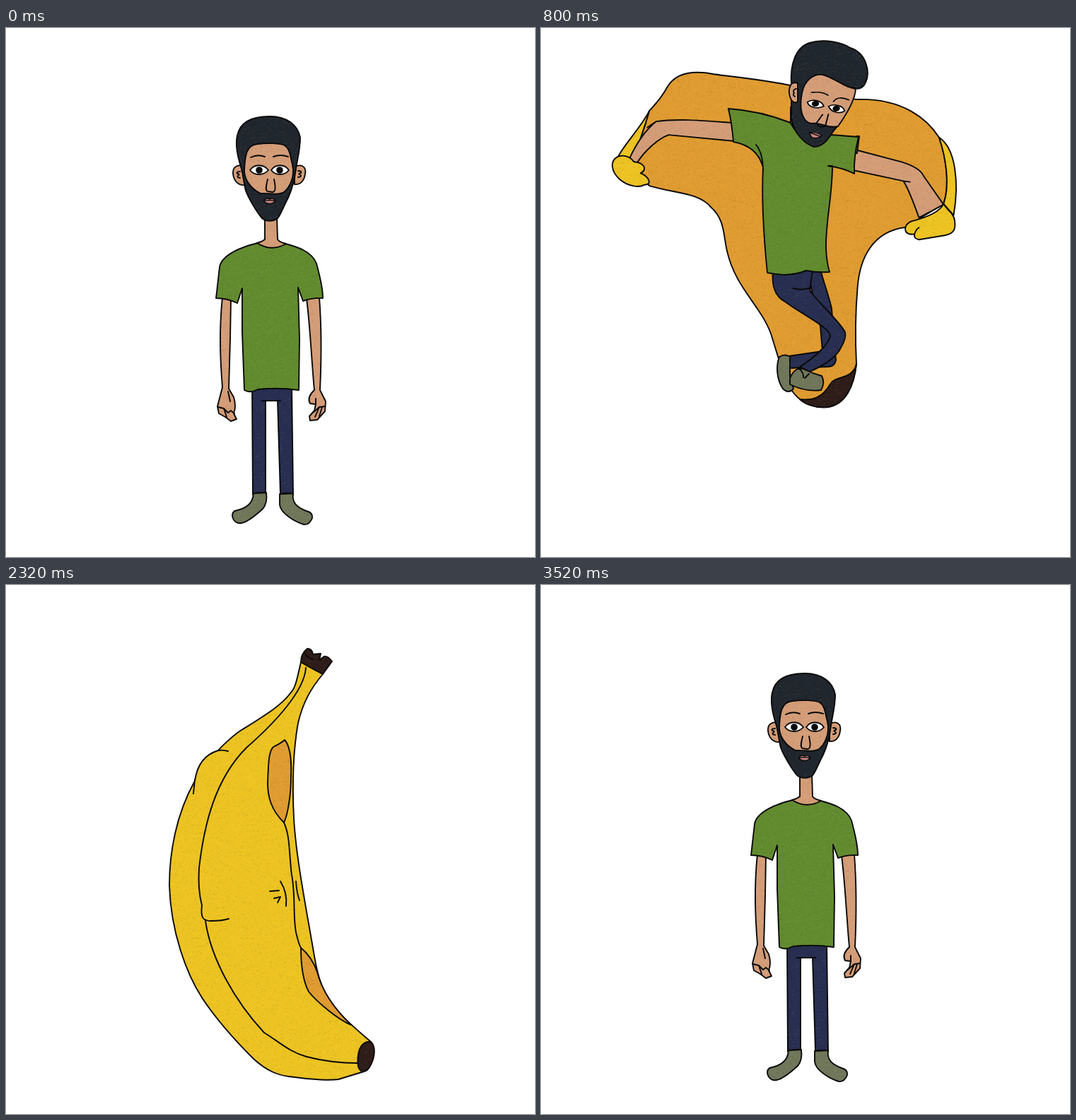
An HTML page with a canvas for the animation above (3680 ms loop, 748x748 px).

```html
<!DOCTYPE html>
<html lang="en">
<head>
<meta charset="utf-8">
<title>Banana man</title>
<style>
html, body { margin: 0; width: 100%; height: 100%; overflow: hidden; background: #fff; }
canvas { display: block; }
</style>
</head>
<body>
<canvas id="stage" width="748" height="748"></canvas>
<script>
const ctx = document.getElementById('stage').getContext('2d');
const HAIR = '#20262d', SKIN = '#d49d78', SHIRT = '#628b2f', JEANS = '#272e51', SHOE = '#70775a';
const PEEL = '#edc422', FLESH = '#e09c31', TIP = '#2e1c19', LIP = '#c98580', INK = '#080808';

const lerp = (a, b, e) => a + (b - a) * e;

// Fills the first closed outline only, then inks every line
function shape(d, fill, width = 1.9) {
  if (fill) {
    ctx.fillStyle = fill;
    ctx.fill(new Path2D(d.split('Z')[0]));
  }
  ctx.lineWidth = width;
  ctx.strokeStyle = INK;
  ctx.stroke(new Path2D(d));
}
function dot(x, y, r) {
  ctx.beginPath();
  ctx.arc(x, y, r, 0, 7);
  ctx.fillStyle = INK;
  ctx.fill();
}
function limbs(list, width, color) {
  for (const [w, c] of [[width + 3.8, INK], [width, color]]) {
    ctx.lineWidth = w;
    ctx.strokeStyle = c;
    for (const pts of list) {
      ctx.beginPath();
      pts.forEach(p => ctx.lineTo(...p));
      ctx.stroke();
    }
  }
}
function at(x, y, draw) {
  ctx.save();
  ctx.translate(x, y);
  draw();
  ctx.restore();
}
// Blends two paths that share the same commands
function mix(a, b, e) {
  const n = b.match(/[\d.]+/g);
  let i = 0;
  return a.replace(/[\d.]+/g, v => lerp(+v, +n[i++], e));
}
const warp = (d, map) => d.replace(/(-?[\d.]+) (-?[\d.]+)/g, (_, x, y) => map(+x, +y).join(' '));

function eye(d, x, y) {
  shape(d, '#fff', 1.8);
  dot(x, y, 4.8);
}

function frontHead() {
  shape('M366 266 L366 299 Q361 303 355 304 Q375 317 396 305 Q387 303 384 299 L383 266Z', SKIN);
  shape('M338 196 C328 192 320 196 321 206 C322 216 328 223 338 222Z', SKIN);
  shape('M408 196 C418 192 425 196 423 206 C422 216 416 222 408 221Z', SKIN);
  shape('M331 203 Q325 203 327 206 Q331 207 329 208 Q325 211 331 212');
  shape('M413 202 Q419 202 417 205 Q413 206 415 207 Q420 210 413 211');
  shape('M332 196 C327 180 324 165 327 152 C331 133 348 125 373 125 C398 125 413 138 416 155 C416 172 412 185 410 199 C408 215 405 227 399 240 C392 253 388 265 384 269 C378 274 368 274 362 269 C355 261 343 241 339 230 C336 218 335 205 332 196Z', HAIR);
  shape('M337 200 C338 185 338 165 356 164 C370 162 388 163 394 166 C402 171 402 183 405 193 L406 200 C407 215 398 232 388 234 C380 236 366 233 360 234 C345 227 336 212 337 200Z', SKIN);
  eye('M345 201 C351 192 364 192 371 201 C364 209 351 209 345 201Z', 358, 201);
  eye('M375 201 C381 192 394 192 400 201 C394 209 381 209 375 201Z', 387, 201);
  shape('M346 183 Q356 178 366 182 M378 182 Q388 178 399 182');
  shape('M370 214 C368 222 366 230 370 231 L377 232 C383 231 380 220 379 214');
  shape('M364 245 Q368 239 373 242 Q378 239 381 245 Q373 252 364 245Z M364 245 Q373 242 381 245', LIP, 1.4);
}

const standShirt = 'M356 304 C335 309 305 320 302 338 L297 382 Q313 382 327 389 L334 368 L334 430 L337 512 Q345 517 356 511 Q385 508 414 512 L415 440 L413 367 L420 386 Q434 381 448 382 C448 365 442 345 439 333 C432 315 410 309 395 305 Q375 316 356 304Z';
const crouchShirt = 'M348 447 C330 450 309 464 306 486 L302 523 Q318 521 333 525 L335 490 L335 530 L339 580 Q352 577 362 580 Q388 590 411 579 L406 540 L405 487 L409 526 Q425 524 439 526 C438 510 438 490 432 476 C424 460 400 450 388 447 Q368 460 348 447Z';

function standShoes() {
  shape('M350 658 L368 657 Q370 672 363 680 C352 690 340 699 333 700 C322 702 316 688 323 683 C336 680 349 675 350 658Z', SHOE);
  shape('M387 659 L406 658 C404 672 412 678 425 683 Q434 685 433 693 Q429 703 421 702 C408 698 388 686 387 674Z', SHOE);
}
function crouchShoes() {
  shape('M352 652 L369 651 Q367 670 373 680 Q377 695 366 696 L350 697 Q342 692 347 680 Q351 665 352 652Z M349 679 Q358 674 368 676', SHOE);
  shape('M390 653 L406 654 Q407 672 418 676 Q421 690 418 697 L398 697 Q390 690 393 680 Q385 668 387 660Z M397 663 L408 664 M398 676 Q408 672 412 674', SHOE);
}

function stand() {
  shape('M348 505 L349 660 Q358 656 367 657 L367 527 L384 527 L388 659 Q398 656 406 660 L404 505Z M362 527 L388 527', JEANS);
  standShoes();
  shape('M306 380 L318 383 L317 440 L315 510 L322 522 Q326 535 322 545 L326 553 L318 556 L310 550 L301 545 L299 535 L306 508 C303 470 301 430 306 380Z', SKIN);
  shape('M314 514 L317 528 M300 536 L308 538 L312 550 M308 538 L314 544 L318 541 L323 545');
  shape('M425 383 L443 381 C446 420 446 470 444 512 L452 528 L451 542 L440 554 L430 555 L429 549 L436 541 L438 532 L430 531 Q425 522 436 512 C432 470 430 420 425 383Z', SKIN);
  shape('M438 532 L438 524 M451 535 L443 536 L437 550 M443 536 L435 543 M447 536 L443 549');
  shape(standShirt, SHIRT);
  frontHead();
}

function crouch() {
  shape('M305 521 L301 558 Q301 564 310 567 L338 578 L336 571 L323 562 Q320 545 326 521Z', SKIN);
  shape('M437 524 L442 557 Q440 566 430 570 L410 577 L411 567 Q426 560 421 556 L415 522Z', SKIN);
  shape(crouchShirt, SHIRT);
  crouchShoes();
  shape('M320 572 C308 572 297 585 301 600 C305 612 340 640 353 655 L368 652 C360 635 350 622 347 614 C365 620 395 620 412 614 C405 630 395 645 393 653 L406 654 C420 635 448 612 449 592 C450 578 436 568 420 571 C400 588 380 586 365 582 C345 583 335 573 320 572Z', JEANS);
  shape('M340 597 Q341 607 335 612 M340 603 L347 614 M414 596 Q413 607 418 601 M414 602 L410 615 M350 576 L372 577 M354 573 Q378 569 384 577');
  at(-7, 150, frontHead);
}

// Sinking from standing to crouching while the arms swing out
function sink(k) {
  const e = [0, .08, .25, .5, .75, .92][k], out = [0, .7, 1, .8, .5, .2][k];
  const arm = (cuff, side) => {
    const y = lerp(380, 520, e);
    return [[cuff, y], [cuff + side * 55 * out, y + lerp(60, 40, e)],
      [cuff + side * 106 * out, lerp(530, 572, e) - 85 * out]];
  };
  const leg = (hip, knee, foot) =>
    [[hip, lerp(515, 598, e)], [lerp(hip, knee, e), lerp(588, 592, e)], [foot, 650]];
  const legs = () => {
    limbs([leg(358, 314, 360), leg(394, 436, 397), [[358, lerp(515, 598, e)], [394, lerp(515, 598, e)]]], 18, JEANS);
    (e < .5 ? standShoes : crouchShoes)();
  };
  if (e < .7) legs();
  limbs([arm(313, -1), arm(432, 1)], 13, SKIN);
  shape(mix(standShirt, crouchShirt, e), SHIRT);
  if (e >= .7) legs();
  at(-7 * e, 150 * e, frontHead);
}

function sideFeatures() {
  eye('M329 253 C334 245 346 245 352 252 C346 260 334 260 329 253Z', 340, 252);
  eye('M358 250 C364 243 376 243 381 250 C376 258 364 257 358 250Z', 369, 250);
  shape('M328 237 Q340 231 350 234 M361 241 Q362 230 379 232');
  shape('M356 265 L354 280 Q360 287 367 281 L363 262');
  shape('M351 297 Q360 293 369 296 Q366 304 357 303Z M351 297 L368 298', LIP, 1.4);
}

// Arms spread wide; the peel hangs between the fists
function open({ dy = 0, left = 1, right = 1, lift = 0, peel = true }) {
  const spread = d => warp(d, (x, y) => {
    const far = x < 266 ? 266 - x : Math.max(0, x - 446);
    return [x < 266 ? 266 - far * left : x > 446 ? 446 + far * right : x, y - lift * far / 100];
  });
  const wide = (d, fill) => shape(spread(d), fill);
  at(0, dy, () => {
    if (peel) {
      wide('M357 155 C320 147 280 143 250 143 C225 144 210 155 202 175 C195 195 188 206 183 215 C180 230 175 255 165 292 L183 321 C210 324 235 315 247 332 C262 345 260 370 264 390 C275 440 310 465 325 505 C336 540 345 575 358 590 C370 605 390 611 405 609 C430 606 443 575 446 548 C444 510 445 470 447 440 C449 400 460 365 490 368 L524 345 C530 320 526 280 520 250 C510 222 488 184 445 174Z', FLESH);
      shape('M446 548 C443 580 430 606 405 609 C388 611 372 604 366 598 C385 600 398 595 408 578 C415 563 440 572 446 548Z', TIP);
      wide('M183 215 C175 240 152 280 150 292 L165 292 C175 255 180 230 183 215Z', PEEL);
      wide('M520 250 C535 270 538 320 533 364 L524 345 C530 320 526 280 520 250Z', PEEL);
    }
    shape('M376 415 L396 418 C402 440 408 455 411 470 L417 543 Q415 552 405 552 L350 554 L350 537 L398 530 L395 495Z', JEANS);
    shape('M328 416 C326 435 330 452 345 460 C370 478 390 487 404 500 Q411 506 408 512 C400 528 385 540 366 552 L380 559 C400 550 418 538 424 525 Q432 512 430 503 C420 485 395 465 380 444 L384 416Z M356 441 Q370 445 382 440', JEANS);
    shape('M337 538 C332 550 333 570 342 583 Q350 591 357 583 L352 565 L352 538 Q345 533 337 538Z', SHOE);
    shape('M352 568 Q360 550 373 556 Q385 562 397 565 Q402 575 396 585 Q375 588 352 577Z M362 553 Q372 559 371 567 M373 568 L379 562', SHOE);
    wide('M270 207 C240 212 215 216 190 228 C178 245 168 270 162 290 L170 293 C178 273 192 252 203 243 L274 233Z M190 228 L181 239', SKIN);
    wide('M444 245 L487 275 Q503 288 506 300 L524 346 L502 358 C498 340 493 315 488 302 L441 274Z M488 302 L494 305', SKIN);
    const fist = peel ? PEEL : SKIN;
    wide('M150 290 C142 298 143 312 152 321 C160 328 172 328 178 321 C187 318 182 308 174 306 C183 296 175 290 167 292 C163 285 155 285 150 290Z', fist);
    wide('M524 345 C527 355 533 360 534 372 C535 385 533 390 525 390 L502 389 Q497 386 498 380 C488 380 487 364 495 361 C507 360 520 357 524 345Z M498 380 Q499 374 502 372', fist);
    shape('M446 226 L450 226 L447 250 L440 250Z', SHIRT);
    shape('M265 187 Q310 190 353 207 Q372 245 410 224 L449 227 Q442 255 443 279 Q425 270 406 268 L412 268 C412 310 402 350 403 385 Q404 405 408 418 Q390 419 375 416 Q350 426 320 419 Q311 330 314 270 Q306 240 272 234 Q270 208 265 187Z M304 238 Q314 250 314 275', SHIRT);
    shape('M353 185 L353 207 Q362 224 380 225 L370 195Z', SKIN);
    shape('M354 152 C352 125 360 100 380 94 C400 88 425 93 437 101 C460 108 466 135 459 150 C455 160 447 160 441 157 C441 175 430 200 414 218 C405 232 398 241 386 241 C373 237 357 222 354 200Z', HAIR);
    shape('M369 165 C372 148 385 137 398 139 C415 143 430 158 445 159 C444 175 432 195 420 212 C405 216 395 205 382 208 C368 205 365 185 369 165Z', SKIN);
    shape('M363 151 C352 147 349 160 352 170 C355 180 362 180 363 176Z M361 159 Q355 160 358 165 Q355 167 359 170', SKIN);
    // The face tilts and turns a little more than in the peel
    at(403, 183, () => {
      ctx.transform(.99, .29, -.44, .83, 0, 0);
      ctx.translate(-354.5, -250.5);
      sideFeatures();
    });
  });
}

function sideMan() {
  shape('M357 405 L373 411 Q364 425 366 431 Q390 432 414 427 L415 415 Q421 408 426 413 L427 443 Q418 447 413 440 Q390 450 360 448Z M414 427 L416 431', SKIN);
  shape('M334 517 L365 508 Q375 513 378 522 C400 565 440 600 476 640 L460 655 L430 662 C395 630 350 565 334 517Z M346 538 Q358 539 368 532 M358 538 C380 580 410 606 428 628', JEANS);
  shape('M254 332 C270 318 300 312 312 313 Q330 340 344 321 C365 327 385 345 384 370 C383 385 377 400 374 411 L357 407 C355 440 365 470 378 495 Q386 512 390 520 Q388 527 380 526 Q370 522 371 514 Q355 509 334 517 C325 470 305 425 297 408 C275 380 255 360 254 332Z M361 379 Q357 395 357 408', SHIRT);
  shape('M315 280 Q321 300 317 312 Q324 334 344 323 Q333 315 331 300Z', SKIN);
  shape('M288 235 C295 215 314 200 322 190 C335 178 352 174 365 180 C380 186 388 205 385 215 L384 235 L382 270 C382 285 375 305 368 318 C355 325 342 320 333 305 L316 286 Q300 265 288 235Z', HAIR);
  shape('M316 235 Q317 217 332 217 Q360 211 383 216 C386 235 381 262 383 285 C370 290 355 283 340 283 C325 278 318 262 316 235Z', SKIN);
  shape('M313 253 C302 246 296 256 299 266 Q303 278 313 276Z M309 258 Q303 259 306 264 Q303 266 309 269', SKIN);
  sideFeatures();
}

function wrapped() {
  shape('M362 98 C368 120 368 150 358 162 C350 172 345 168 334 172 C290 195 225 245 207 300 C198 330 199 360 203 385 L207 405 L203 430 L210 439 C245 505 310 590 430 668 L504 620 C505 610 480 585 469 550 C455 505 462 470 465 430 C467 390 470 350 460 320 C440 265 415 230 388 202 Q384 195 386 187 C395 150 396 120 393 95Z', PEEL);
  shape('M357 77 C355 85 360 92 362 98 Q378 99 394 95 Q394 82 389 74 L380 79 L377 83 L370 76 Q362 78 357 77Z', TIP);
  shape('M322 190 Q352 170 386 195 C405 235 427 300 427 370 C422 420 430 460 442 500 C455 545 475 580 493 612 L470 640 L430 660 C400 630 352 565 336 517 C327 470 307 425 299 408 C277 380 255 360 254 332 C258 285 290 232 322 190Z', FLESH);
  sideMan();
  shape('M416 664 L437 667 L467 660 L505 640 Q508 660 503 672 L494 680 Q486 679 487 672 L474 676 L470 689 Q460 695 452 690Z', TIP);
  shape('M426 630 Q432 624 445 626 Q462 633 463 645 L467 660 L437 667 Q420 650 426 630Z M429 642 Q434 636 440 641', SHOE);
  shape('M463 650 Q480 640 483 620 Q487 612 495 613 Q503 614 504 626 L504 640 L467 662Z M478 640 Q488 636 494 638 M490 628 Q495 624 502 626', SHOE);
  shape('M335 172 C280 235 222 280 220 370 L219 396 M335 172 L322 190 M211 398 L203 430 Q225 447 253 454 M234 424 Q250 432 268 430 M288 417 Q284 437 299 449 M277 433 L286 428 M280 441 L283 438 M236 452 C270 510 320 570 350 600 L428 664');
  shape('M445 393 Q443 412 437 412 L432 409 M438 418 L431 420 Q430 445 438 445 Q448 440 444 430 L440 424');
}

const bumpSide = 'C320 214 305 228 300 234 C280 240 270 255 267 277 C240 325 231 380 231 425';
const smoothSide = 'C315 218 295 238 284 254 C250 305 231 365 231 425';
function banana(side) {
  shape(`M417 109 C412 130 410 145 402 153 C390 170 365 185 330 207 ${side} C233 490 255 550 278 585 C300 618 325 645 350 670 C370 688 385 693 400 695 C430 699 455 701 470 699 L506 688 L516 646 C500 632 475 612 460 592 C445 570 440 548 436 525 C425 460 410 385 407 330 C405 290 405 240 413 195 C420 165 432 145 448 126Z`, PEEL);
  shape('M417 109 Q417 97 426 90 Q433 90 434 98 L445 97 L443 106 L450 101 Q455 100 461 108 L448 126 Q430 117 417 109Z M423 97 Q427 104 434 105', TIP);
  shape('M516 646 C523 652 522 668 515 680 Q510 690 502 687 C494 682 497 655 505 649 Q510 645 516 646Z', TIP);
  shape('M424 117 C422 150 380 195 340 230 C295 275 280 340 273 400 Q271 430 277 453');
  shape('M282 475 C290 530 325 590 365 633 C385 645 400 660 425 667 Q460 676 497 676');
}

const seam = 'M393 336 C402 355 400 380 404 410 C410 440 405 475 411 495 Q414 508 417 513';
function nearlyShut() {
  banana(bumpSide);
  shape('M277 453 C275 470 278 475 290 475 Q305 475 315 472 M300 234 Q306 233 314 235 M267 275 L265 295');
  shape('M394 219 C402 228 404 245 403 270 C403 300 398 325 393 336 C375 318 370 300 370 280 C371 255 371 235 378 229 Q390 223 394 219Z', FLESH);
  shape('M417 513 Q432 525 440 547 C447 575 465 600 488 622 C470 615 440 590 428 575 C420 560 417 540 417 513Z', FLESH);
  shape(seam + ' M388 419 Q398 435 396 454 M410 419 Q411 435 415 446 M373 433 L386 432 M379 443 L388 441 L384 449');
}

function shut() {
  at(375, 395, () => {
    ctx.scale(1.03, 1.022);
    ctx.translate(-375, -395);
    banana(smoothSide);
    shape('M277 453 Q279 465 282 475 M400 205 C385 270 397 360 404 410 C410 470 412 500 428 550 Q450 590 488 622');
  });
}

// The gap between the peel's edges narrows with its left edge
function closing(edge) {
  banana(bumpSide);
  const gap = `M394 205 C${edge} 265 ${edge - 5} 400 ${edge + 50} 480 C${edge + 80} 560 440 605 488 622 C445 575 430 500 418 420 C404 340 402 250 394 205Z`;
  ctx.save();
  ctx.clip(new Path2D(gap));
  shape(gap, FLESH);
  at(18, 25, sideMan);
  ctx.restore();
  shape(gap);
  shape('M277 453 C275 470 278 475 290 475 Q305 475 315 472');
}

const poses = [
  stand,
  ...[1, 2, 3, 4, 5].map(k => () => sink(k)),
  crouch,
  () => open({ dy: 105, left: 1.12, right: 1.54, lift: 30, peel: false }),
  () => open({ dy: 15, left: 1.5, right: 1.93, lift: 55 }),
  () => open({ dy: -73, left: 1.36, right: 1.58, lift: 30 }),
  () => open({}),
  () => open({ dy: 45, left: .68, right: .65, lift: -30 }),
  wrapped,
  () => closing(290),
  () => closing(335),
  nearlyShut,
  shut
];

// Fine paper grain, seeded
function makeGrain() {
  const size = 160, tile = new OffscreenCanvas(size, size), g = tile.getContext('2d');
  let seed = 7;
  const rnd = () => (seed = seed * 16807 % 2147483647) / 2147483647;
  for (let i = 0; i < 5200; i++) {
    g.fillStyle = `rgba(${rnd() < .6 ? '40,20,0' : '255,235,190'},${rnd() * .08})`;
    g.fillRect(rnd() * size, rnd() * size, 1 + rnd() * 2, 1);
  }
  return ctx.createPattern(tile, 'repeat');
}
const grain = makeGrain();
ctx.lineCap = ctx.lineJoin = 'round';

const STEP = 80, LOOP = 3680;
let shown = -1;
function tick() {
  const n = Math.floor(performance.now() % LOOP / STEP);
  const k = Math.max(0, Math.min(n - 1, 16, 44 - n));
  if (k !== shown) {
    shown = k;
    ctx.clearRect(0, 0, 748, 748);
    poses[k]();
    ctx.globalCompositeOperation = 'source-atop';
    ctx.fillStyle = grain;
    ctx.fillRect(0, 0, 748, 748);
    ctx.globalCompositeOperation = 'source-over';
  }
  requestAnimationFrame(tick);
}
tick();
</script>
</body>
</html>
```
